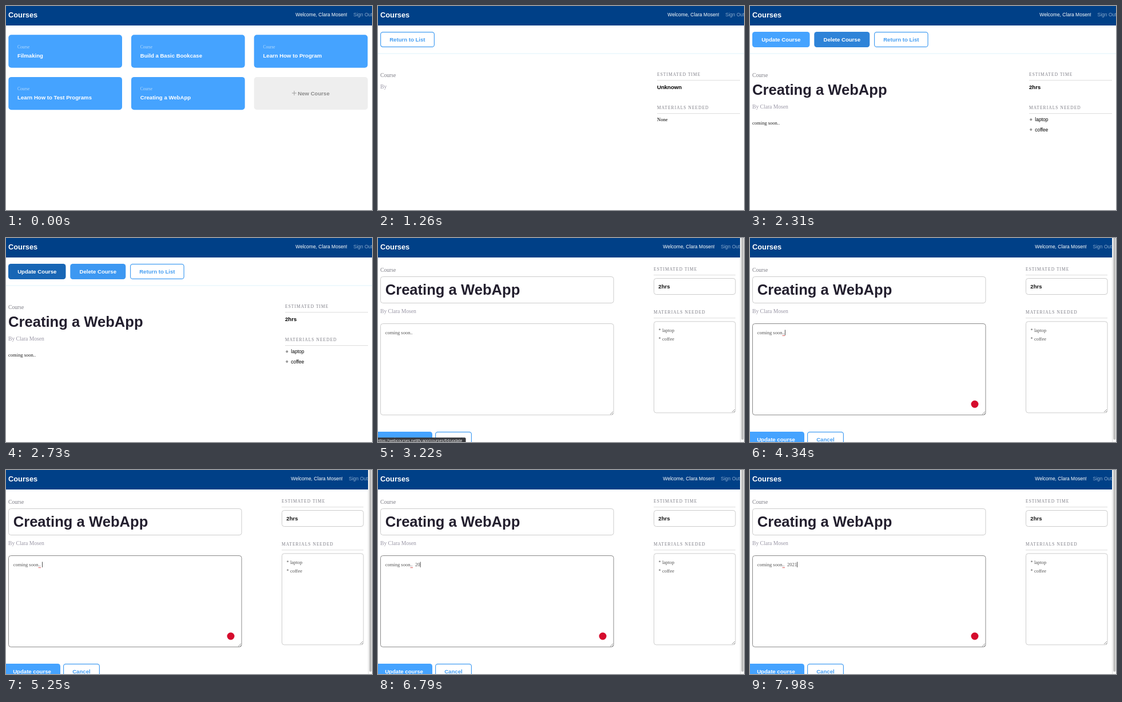
Write an HTML page that moves like this. It is 640 by 356 pixels and loops after 8000 ms.

```html
<!DOCTYPE html>
<html lang="en">
<head>
<meta charset="utf-8">
<title>Courses</title>
<style>
html, body { margin: 0; width: 100%; height: 100%; overflow: hidden; background: #fff; }
svg { display: block; width: 640px; height: 356px; }
text { white-space: pre; }
.sans { font-family: "Liberation Sans", Arial, sans-serif; font-size: 8.53px; }
.bold { font-family: "Liberation Sans", Arial, sans-serif; font-size: 9.6px; font-weight: bold; }
.serif { font-family: "Liberation Serif", Times, serif; font-size: 8.53px; }
.big { font-size: 25.6px; }
.logo { font-size: 12.8px; }
.lead { font-size: 9.6px; }
.tag { font-size: 7.47px; }
.label { font-size: 7.47px; letter-spacing: 1.067px; }
.status { font-size: 6.9px; }
</style>
</head>
<body>
<svg id="stage" viewBox="0 0 640 356"></svg>
<script>
const LOOP = 8000;
const USER = 'Clara Mosen';
const BLUE = '#45a3ff', DEEP = '#1866b5', INK = '#231f2e', GREY = '#7d7d86', PALE = '#9a97a6';

const text = (x, y, s, cls, fill, extra = '') =>
  `<text x="${x}" y="${y}" class="${cls}" fill="${fill}" ${extra}>${s}</text>`;
const rect = (x, y, w, h, fill, r = 0, extra = '') =>
  `<rect x="${x}" y="${y}" width="${w}" height="${h}" rx="${r}" fill="${fill}" ${extra}/>`;
const box = (x, y, w, h, stroke, extra = '') =>
  rect(x, y, w, h, '#fff', 4, `stroke="${stroke}" ${extra}`);
const line = (x1, y1, x2, y2, stroke) =>
  `<path d="M${x1} ${y1}L${x2} ${y2}" stroke="${stroke}" fill="none"/>`;
const group = (id, body) => `<g id="${id}">${body}</g>`;

const header = right =>
  rect(0, 0, 640, 34, '#004087') +
  text(4, 20.3, 'Courses', 'bold logo', '#fff') +
  text(right - 43, 17.8, `Welcome, ${USER}!`, 'sans', '#fff', 'text-anchor="end"') +
  text(right - 32.5, 17.8, 'Sign Out', 'sans', '#89a9cd');

const card = (title, i) => {
  const x = 4.3 + i % 3 * 214.7, y = 50.3 + Math.floor(i / 3) * 73.6;
  return rect(x, y, 198.7, 57.4, BLUE, 5) +
    text(x + 15.8, y + 23.2, 'Course', 'serif tag', '#b5dafb') +
    text(x + 15.8, y + 39.2, title, 'bold', '#fff');
};

const button = (x, y, w, label, pad, id = '') =>
  rect(x, y, w, 27, BLUE, 4.5, id && `id="${id}"`) + text(x + pad, y + 16.8, label, 'bold', '#fff');
const outline = (x, y, w, label, pad) =>
  box(x + .6, y + .6, w - 1.2, 25.8, '#459ef2', 'stroke-width="1.2"') +
  text(x + pad, y + 16.8, label, 'bold', '#459ef2');

const section = (x, y, right, label) =>
  text(x, y, label, 'serif label', GREY) + line(x, y + 7.5, right, y + 7.5, '#dcdcdc');
const detailBase = header(640) + line(0, 83, 640, 83, '#dff3fb') +
  text(4, 124.3, 'Course', 'serif lead', GREY) +
  section(488, 122.2, 633, 'ESTIMATED TIME') + section(488, 180.2, 633, 'MATERIALS NEEDED');
const item = (y, s) =>
  `<circle cx="491.3" cy="${y - 2.8}" r="1.3" fill="none" stroke="#000" stroke-width=".7"/>` +
  text(498.3, y, s, 'sans', '#000');
const grip = (x, y) => line(x - 6, y - 1, x - 1, y - 6, '#999') + line(x - 3, y - 1, x - 1, y - 3, '#999');

const titles = ['Filmaking', 'Build a Basic Bookcase', 'Learn How to Program',
  'Learn How to Test Programs', 'Creating a WebApp'];

const scenes = {
  list: header(640) + titles.map(card).join('') +
    rect(433.7, 124, 199, 57, '#eee', 5) +
    `<path d="M500 152H508M504 148V156" stroke="#8b8b8b" stroke-width=".8"/>` +
    text(510.3, 155.6, 'New Course', 'bold', '#8b8b8b'),

  loading: detailBase + outline(4, 45, 95, 'Return to List', 16.2) +
    text(4, 144.3, 'By', 'serif lead', PALE) +
    text(488, 144.6, 'Unknown', 'bold', '#000') + text(488, 201, 'None', 'serif', '#000'),

  detail: detailBase +
    button(4, 45, 100.5, 'Update Course', 16.2, 'update') +
    button(112.3, 45, 97, 'Delete Course', 16.2, 'remove') +
    outline(217, 45, 94.7, 'Return to List', 16.2) +
    text(4, 155.3, titles[4], 'bold big', INK) +
    text(4, 178.6, `By ${USER}`, 'serif lead', PALE) +
    text(4, 207.4, 'coming soon..', 'serif', '#222') +
    text(488, 144.6, '2hrs', 'bold', '#000') + item(201, 'laptop') + item(218.5, 'coffee'),

  form: header(632) +
    text(4, 59.3, 'Course', 'serif lead', GREY) +
    box(4.5, 67.5, 407.5, 46, '#ccc') + text(12.7, 99.3, titles[4], 'bold big', INK) +
    text(4, 130.9, `By ${USER}`, 'serif lead', PALE) +
    box(4.5, 149.5, 407.5, 159.3, '#ccc', 'id="area"') + grip(412, 309) +
    text(12.7, 168, '', 'serif', '#555', 'id="typed"') +
    group('focus', '<path d="M56.5 170.3H61" stroke="#d9534f"/>' +
      '<circle cx="393" cy="290" r="6.5" fill="#d50c2d"/>' +
      rect(0, 160.3, .8, 9.5, '#222', 0, 'id="caret"')) +
    section(482, 57.2, 625, 'ESTIMATED TIME') +
    box(482.5, 70.5, 142.5, 28, '#ccc') + text(490.3, 88, '2hrs', 'bold', '#111') +
    section(482, 132.2, 625, 'MATERIALS NEEDED') +
    box(482.5, 145.8, 142.5, 159.2, '#ccc') + grip(625, 305) +
    text(490.5, 164.2, '* laptop', 'serif', '#555') + text(490.5, 179.2, '* coffee', 'serif', '#555') +
    button(-4, 338, 99, 'Update course', 16.2) + outline(100, 338, 64, 'Cancel', 16.2) +
    rect(633, 0, 7, 356, '#fafafa') + line(633.5, 0, 633.5, 356, '#e4e4e4') +
    rect(635.3, -4, 4, 356, '#bdbdbd', 2) +
    group('status', rect(-4, 348.3, 157.5, 12, '#38393d', 2) +
      text(-1.5, 355.6, 'https://webcourses.netlify.app/courses/64/update', 'sans status', '#eee'))
};

const $ = id => document.getElementById(id);
$('stage').innerHTML = Object.entries(scenes).map(([id, body]) => group(id, body)).join('');

const starts = [['list', 0], ['loading', 1190], ['detail', 1400], ['form', 3080]];
const keys = [[4130, ''], [4950, ' '], [5880, '  '], [6300, '  2'], [6600, '  20'], [7180, '  202'], [7600, '  2021']];
const last = (steps, at) => steps.filter(at).pop();
const ramp = (t, from, to) => Math.min(1, Math.max(0, (t - from) / (to - from)));
const show = (id, on) => $(id).setAttribute('display', on ? 'inline' : 'none');
const mix = (a, b, k) => '#' + [1, 3, 5].map(i => {
  const p = parseInt(a.substr(i, 2), 16), q = parseInt(b.substr(i, 2), 16);
  return Math.round(p + (q - p) * k).toString(16).padStart(2, '0');
}).join('');

function draw() {
  const t = performance.now() % LOOP;
  const scene = last(starts, s => t >= s[1])[0];
  for (const id in scenes) show(id, id === scene);

  // The pointer crosses Delete and settles on Update.
  $('update').setAttribute('fill', mix(BLUE, DEEP, ramp(t, 2450, 2720)));
  $('remove').setAttribute('fill', mix(BLUE, DEEP, ramp(t, 2170, 2440) - ramp(t, 2460, 2790)));

  $('status').setAttribute('opacity', 1 - ramp(t, 3700, 3850));
  const key = last(keys, k => t >= k[0]);
  show('focus', key);
  $('area').setAttribute('stroke', key ? '#8a8a8a' : '#ccc');
  $('typed').textContent = 'coming soon..' + (key ? key[1] : '');
  if (key) {
    $('caret').setAttribute('x', 12.9 + $('typed').getComputedTextLength());
    show('caret', (t - key[0]) % 1000 < 500);
  }
  requestAnimationFrame(draw);
}
draw();
</script>
</body>
</html>
```
